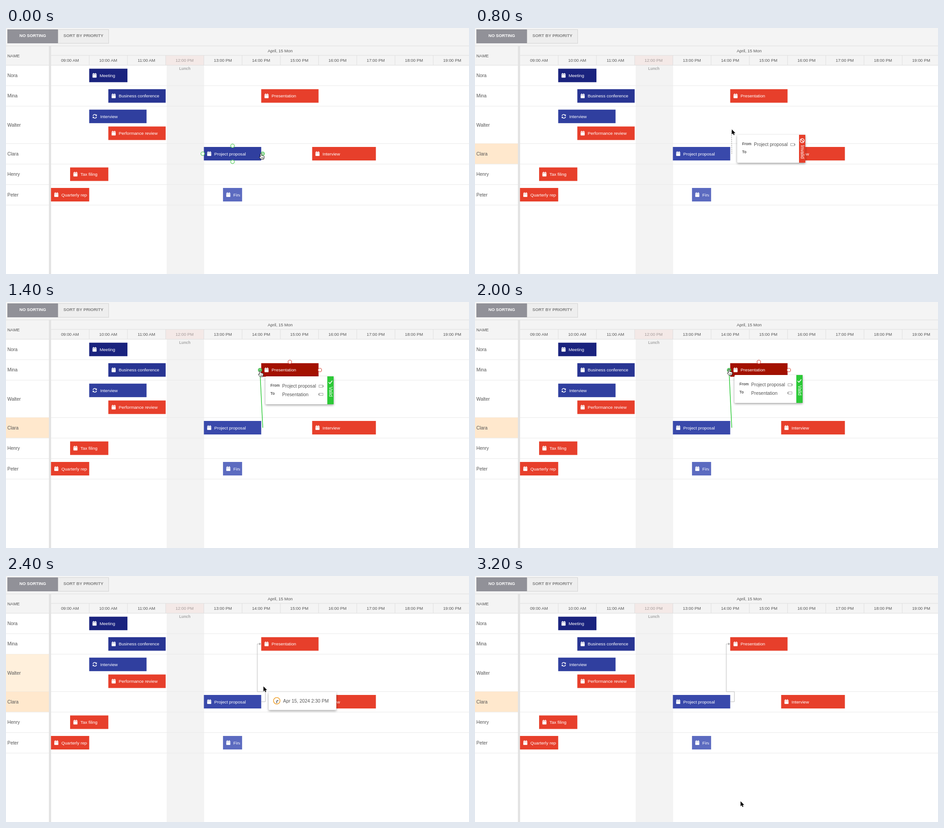
An HTML page for the animation above (3400 ms loop, 1026 px wide and 546 px high).

```html
<!DOCTYPE html>
<html lang="en">
<head>
<meta charset="utf-8">
<title>Scheduler dependency drag</title>
<style>
  html, body { margin: 0; width: 100%; height: 100%; overflow: hidden; background: #fff; }
  svg { display: block; font-family: "Liberation Sans", Arial, Helvetica, sans-serif; }
  .popup { filter: drop-shadow(0 2px 2.5px rgba(0, 0, 0, .38)); }
</style>
</head>
<body>
<svg id="stage" width="1026" height="546" viewBox="0 0 1026 546"></svg>
<script>
const LOOP = 3400, TICK = 84.7, LEFT = 99.7;
const RED = '#e73f2b', DARK_RED = '#a31100', GREEN = '#2cc937', GREY = '#555';

// Pointer keyframes; each holds until the next one.
const steps = [
  { at: 0, x: 565, y: 278.5, mode: 'hover', tip: 0 },
  { at: 200, x: 567.5, y: 278.5, mode: 'hover', tip: .5 },
  { at: 400, x: 570.5, y: 278.5, mode: 'hover', tip: 1 },
  { at: 800, x: 569, y: 225, mode: 'drag' },
  { at: 1000, x: 567, y: 176, mode: 'drag' },
  { at: 1200, x: 563, y: 155, mode: 'snap' },
  { at: 1400, x: 563, y: 153, mode: 'snap' },
  { at: 1800, x: 563, y: 150, mode: 'snap' },
  { at: 2200, x: 567, y: 205, mode: 'linked', row: .5, time: .5 },
  { at: 2400, x: 570.5, y: 245, mode: 'linked', row: 1, time: 1 },
  { at: 2600, x: 590, y: 507, mode: 'linked' },
  { at: 2800, x: 589, y: 504, mode: 'linked' },
  { at: 3000, x: 588.5, y: 500, mode: 'linked' }
];

const rows = [
  ['Nora', 83, 128], ['Mina', 128, 173.5], ['Walter', 173.5, 256.5],
  ['Clara', 256.5, 302], ['Henry', 302, 347.5], ['Peter', 347.5, 393]
];

// label, start hour, duration in hours, top, colour
const events = [
  ['Meeting', 10, 1, 90.3, '#1a237e'],
  ['Business conference', 10.5, 1.5, 135.8, '#283593'],
  ['Presentation', 14.5, 1.5, 135.8, RED],
  ['Interview', 10, 1.5, 181.2, '#303f9f', true],
  ['Performance review', 10.5, 1.5, 218.6, RED],
  ['Project proposal', 13, 1.5, 264, '#3949ab'],
  ['Interview', 15.833, 1.667, 264, RED],
  ['Tax filing', 9.5, 1, 309.5, RED],
  ['Quarterly report', 9, 1, 355, RED],
  ['Final review', 13.5, .5, 355, '#5c6bc0']
];

const rect = (x, y, w, h, fill, more = '') =>
  `<rect x="${x}" y="${y}" width="${w}" height="${h}" fill="${fill}" ${more}/>`;
const path = (d, stroke, width = 1, more = '') =>
  `<path d="${d}" fill="none" stroke="${stroke}" stroke-width="${width}" ${more}/>`;
const text = (s, x, y, size, fill = GREY, more = '') =>
  `<text x="${x}" y="${y}" font-size="${size}" fill="${fill}" ${more}>${s}</text>`;
const circle = (x, y, r, fill, stroke, width = 1.2) =>
  `<circle cx="${x}" cy="${y}" r="${r}" fill="${fill}" stroke="${stroke}" stroke-width="${width}"/>`;
const group = (x, y, body, more = '') => `<g transform="translate(${x} ${y})" ${more}>${body}</g>`;
const MID = 'text-anchor="middle"', BOLD = 'font-weight="bold"';

function calendarIcon(colour) {
  return rect(0, 1.3, 9, 9, '#fff', 'rx="1"') + rect(1.7, 0, 1.4, 3, '#fff') +
    rect(5.9, 0, 1.4, 3, '#fff') + rect(0, 3.3, 9, .5, colour);
}

function refreshIcon() {
  return path('M1 4.4A4 4 0 0 1 8.4 3.2M9 6.2A4 4 0 0 1 1.6 7.4', '#fff', 1.4) +
    '<path d="M9.6 .8V4.4H6ZM.4 9.8V6.2H4Z" fill="#fff"/>';
}

function clock(x, y, hour, minute) {
  const hand = (turn, length) => {
    const a = turn * 2 * Math.PI;
    return `M0 0L${Math.sin(a) * length} ${-Math.cos(a) * length}`;
  };
  return group(x, y, circle(0, 0, 7.2, '#fff', '#f0a330', 1.6) +
    path(hand(hour / 12, 3.6) + hand(minute / 60, 5.2), '#4a4f5c', 1.5));
}

function header() {
  let out = rect(0, 0, 1026, 83, '#f4f4f4') + rect(356, 83, 83, 463, '#f3f3f3') +
    rect(353.8, 61, TICK, 21.5, '#f4e9e7') +
    rect(3, 3, 112.5, 31, '#919198') +
    rect(115.5, 3.5, 112, 30.5, '#eeeeee', 'stroke="#d2d2d2"') +
    text('NO SORTING', 59.3, 20.3, 9.35, '#fff', MID + BOLD.padStart(19)) +
    text('SORT BY PRIORITY', 171.5, 20.3, 9.4, '#808080', MID + BOLD.padStart(19)) +
    path('M0 39.8H1026M100 60.8H1026M0 82.7H1026', '#dedede') +
    text('NAME', 3, 64.8, 9.5) + text('April, 15 Mon', 607.5, 54, 9.4, GREY, MID);
  for (let i = 0; i < 11; i++) {
    const hour = 9 + i, label = `${String(hour).padStart(2, '0')}:00 ${hour < 12 ? 'AM' : 'PM'}`;
    out += text(label, 141.7 + i * TICK, 75.4, 9.4, hour === 12 ? '#a39a9a' : GREY, MID);
    if (i) out += path(`M${LEFT + i * TICK} 61V82.5`, '#dedede');
  }
  return out + text('Lunch', 396.3, 93, 8.4, '#a5a5a5', MID + ' ' + BOLD);
}

function rowLabels(step) {
  let out = '';
  rows.forEach(([name, top, bottom], i) => {
    const tint = i === 3 && step.mode !== 'hover' ? '#ffe8cd' : i === 2 && step.row ? '#fff0dc' : '';
    if (tint) out += rect(0, top, 95, bottom - top, tint, `opacity="${i === 2 ? step.row : 1}"`);
    out += path(`M0 ${bottom}H1026`, '#e9e9e9') + text(name, 3, (top + bottom) / 2 + 3.6, 10.4);
  });
  return out + rect(95, 40, 5, 506, '#e3e3e3');
}

function eventBar([label, start, hours, top, colour, recurring], mode) {
  if (label === 'Presentation' && mode === 'snap') colour = DARK_RED;
  if (label === 'Project proposal' && mode === 'hover') colour = '#303f9f';
  const x = LEFT + (start - 9) * TICK, width = hours * TICK;
  return rect(x, top, width, 30, colour) +
    group(x + 7.3, top + 9.6, recurring ? refreshIcon() : calendarIcon(colour)) +
    `<svg x="${x}" y="${top}" width="${width - 4.5}" height="30">` +
    text(label, recurring ? 24.4 : 23, 18.5, 9.7, '#fff') + '</svg>';
}

function eventTip(opacity) {
  return group(430.5, 173.5,
    '<path d="M2 0H142.5a2 2 0 0 1 2 2V75.5a2 2 0 0 1-2 2H77L72 82.5L67 77.5H2a2 2 0 0 1-2-2V2a2 2 0 0 1 2-2Z" fill="#fff"/>' +
    text('Project proposal', 10.3, 23, 10.4, GREY, BOLD) +
    clock(18, 38, 1, 0) + text('Apr 15, 2024 1 PM', 32, 41.7, 10.4) +
    clock(18, 56.7, 2.5, 30) + text('Apr 15, 2024 2:30 PM', 32, 60.4, 10.4),
    `class="popup" opacity="${opacity}"`);
}

function timeTip({ x, y, time }) {
  return group(x + 11.5, y + 12.5, rect(0, 0, 150, 40, '#fff', 'rx="2"') +
    clock(18, 19.5, 2.5, 30) + text('Apr 15, 2024 2:30 PM', 32, 23, 10.4),
    `class="popup" opacity="${time}"`);
}

function dragTip(x, y, valid) {
  const side = (top, dot) => rect(118.5, top, 9, 5, '#fff', 'stroke="#999" stroke-width=".9"') +
    rect(dot, top + 1.5, 2, 2, '#666');
  const mark = valid ? path('M139.8 13L142.8 16L148 9.8', '#fff', 1.6) :
    circle(144, 13, 4.4, 'none', '#fff', 1.5) + path('M141 10L147 16', '#fff', 1.5);
  return group(x + 12, y + 12, rect(0, 0, 151, 62, '#fff', 'rx="2"') +
    rect(137, 0, 14, 62, valid ? GREEN : RED) + mark +
    group(140.6, 23, text(valid ? 'Valid' : 'Invalid', 0, 0, 10.4, '#fff', 'transform="rotate(90)"')) +
    text('From', 11, 22.5, 8.2, GREY, BOLD) + text('Project proposal', 37, 25.2, 10.4) + side(19.3, 126.5) +
    text('To', 11, 41, 8.2, GREY, BOLD) +
    (valid ? text('Presentation', 37, 43.6, 10.4) + side(37.5, 117.5) : ''), 'class="popup"');
}

function pointer({ x, y, mode }) {
  if (mode === 'hover' || mode === 'snap') {
    return group(x, y, '<path d="M-1.4 1.2a1.4 1.4 0 0 1 2.8 0V4.7q1.2-.8 2.1.3 1.3-.6 2 .5 1.7-.2 1.7 1.3V9.2L6 12.8H0L-3.6 8.4q-.4-1.7 1.1-1.5l1.1 1Z" fill="#fff" stroke="#111"/>' +
      path('M1.4 8.3V11M3.2 8.3V11M5 8.3V11', '#111', .7));
  }
  return group(x, y, '<path d="M0 0V11.2L2.6 8.8L4.3 12.8L6.2 12L4.5 8.2H8Z" fill="#000" stroke="#fff" stroke-width=".8" paint-order="stroke"/>');
}

function overlay(step) {
  const { x, y, mode, tip, time } = step;
  if (mode === 'hover') {
    return [[502, 261.5], [436, 279], [502, 297]].map(([a, b]) => circle(a, b, 4, '#fff', '#3cc544')).join('') +
      circle(568.8, 279, 4, '#a9dfae', '#3cc544') + (tip ? eventTip(tip) : '');
  }
  if (mode === 'drag') {
    return path(`M569 279L${x - .7} ${y + 3}`, '#a8a8a8', 1.4, 'stroke-dasharray="2.5 1.8"') + dragTip(x, y, false);
  }
  if (mode === 'snap') {
    return circle(629, 133, 4, '#fff', '#d8493c') + circle(695.5, 151, 4, '#fff', '#d8493c') +
      circle(563, 151, 4, '#6fd277', '#2fae3a') +
      path(`M569 279L562.8 ${y}`, GREEN, 1.5) + dragTip(x, y, true);
  }
  return path('M566 279H574.8V256.8H556.8V150.8H562', '#b9b9b9') +
    '<path d="M561 148L565.5 150.8L561 153.6Z" fill="#a9a9a9"/>' + (time ? timeTip(step) : '');
}

const stage = document.getElementById('stage');
let shown;

function frame(now) {
  const t = now % LOOP, step = steps.findLast(s => s.at <= t);
  if (step !== shown) {
    shown = step;
    stage.innerHTML = header() + rowLabels(step) +
      events.map(e => eventBar(e, step.mode)).join('') + overlay(step) + pointer(step);
  }
  requestAnimationFrame(frame);
}
frame(0);
</script>
</body>
</html>
```
